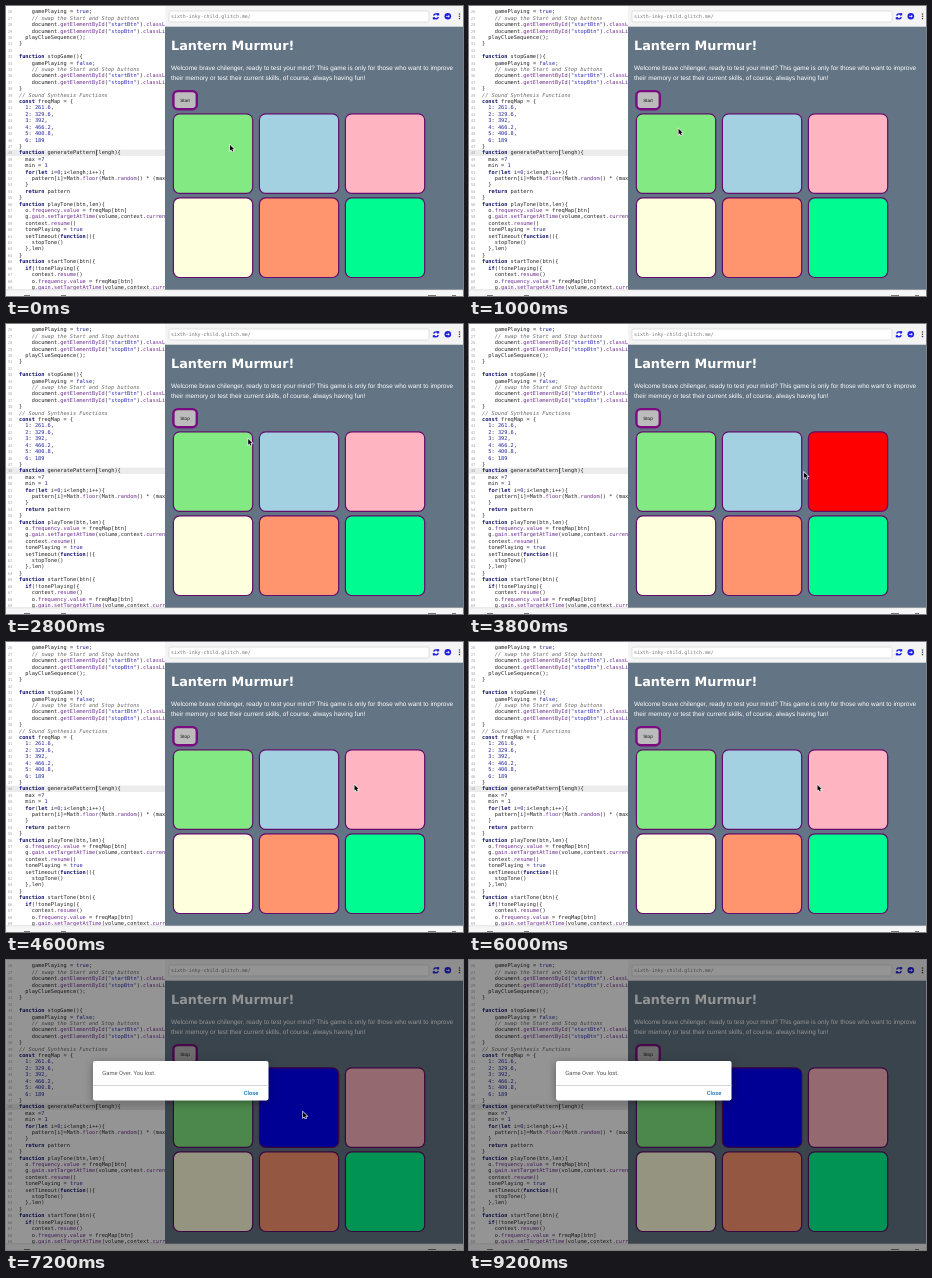
An HTML page with a canvas that plays this animation: 457 px wide and 290 px high, repeating every 9.4 s.

```html
<!DOCTYPE html>
<html lang="en">
<head>
<meta charset="utf-8">
<title>Memory game</title>
<style>
  html, body { margin: 0; width: 100%; height: 100%; overflow: hidden; background: #fff; }
  canvas { display: block; }
</style>
</head>
<body>
<canvas id="stage" width="457" height="290"></canvas>
<script>
const ctx = document.getElementById("stage").getContext("2d");
const LOOP = 9400, STEP = 200;
const MONO = '"DejaVu Sans Mono", monospace';
const SANS = '"Liberation Sans", sans-serif';
const ROBOTO = 'Roboto, sans-serif';
const CHAR = 3.18, LINE = 6.41, CODE_X = 13;

const code = `    gamePlaying = true;
    // swap the Start and Stop buttons
    document.getElementById("startBtn").classList.add("hidden");
    document.getElementById("stopBtn").classList.remove("hidden");
  playClueSequence();
}

function stopGame(){
    gamePlaying = false;
    // swap the Start and Stop buttons
    document.getElementById("startBtn").classList.remove("hidden");
    document.getElementById("stopBtn").classList.add("hidden");
}
// Sound Synthesis Functions
const freqMap = {
  1: 261.6,
  2: 329.6,
  3: 392,
  4: 466.2,
  5: 400.8,
  6: 189
}
function generatePattern(lengh){
  max =7
  min = 1
  for(let i=0;i<lengh;i++){
    pattern[i]=Math.floor(Math.random() * (max - min) + min)
  }
  return pattern
}
function playTone(btn,len){
  o.frequency.value = freqMap[btn]
  g.gain.setTargetAtTime(volume,context.currentTime + 0.05,0.025)
  context.resume()
  tonePlaying = true
  setTimeout(function(){
    stopTone()
  },len)
}
function startTone(btn){
  if(!tonePlaying){
    context.resume()
    o.frequency.value = freqMap[btn]
    g.gain.setTargetAtTime(volume,context.currentTime + 0.05,0.025)`.split("\n");

const tokens = /\/\/.*|"[^"]*"|[\d.]*\d|\.[a-z]\w*|\w+|[^\w\s".]+/gi;
const tokenStyles = [
  [/^\/\//, "#666", "italic "],
  [/^"/, "#2a2ab4", ""],
  [/^(function|const|for|let|return|if)$/, "#14146e", "bold "],
  [/^(\d|true|false)/, "#24249c", ""],
  [/^\./, "#6c2a90", ""],
  [/./, "#222", ""]
];
const tiles = ["#83ea83", "#a4d1e1", "#ffb4c1", "#feffdc", "#ff956f", "#00fc90"];

// Pointer stops: time, x, y
const pointerPath = [
  [0, 224, 139], [600, 224, 139], [1600, 183, 93], [2200, 183, 93], [3600, 333.5, 149],
  [4600, 348.5, 143], [6000, 348.5, 143], [6600, 297, 152], [LOOP, 297, 152]
];

function text(str, x, y, font, color, align = "left") {
  ctx.font = font;
  ctx.fillStyle = color;
  ctx.textAlign = align;
  ctx.fillText(str, x, y);
}

function rect(x, y, w, h, color) {
  ctx.fillStyle = color;
  ctx.fillRect(x, y, w, h);
}

function box(x, y, w, h, radius, fill, stroke, width = 1) {
  ctx.beginPath();
  ctx.roundRect(x, y, w, h, radius);
  ctx.fillStyle = fill;
  ctx.fill();
  if (!stroke) return;
  ctx.strokeStyle = stroke;
  ctx.lineWidth = width;
  ctx.stroke();
}

function dot(x, y, r, color) {
  ctx.beginPath();
  ctx.arc(x, y, r, 0, 7);
  ctx.fillStyle = color;
  ctx.fill();
}

function drawEditor() {
  ctx.save();
  ctx.beginPath();
  ctx.rect(0, 0, 159, 284);
  ctx.clip();
  rect(0, 143.6, 159, 6.4, "#ececec");
  code.forEach((line, row) => {
    const y = 7.3 + row * LINE;
    text(26 + row, 6.5, y, "4px " + MONO, "#aaa", "right");
    for (const m of line.matchAll(tokens)) {
      const [, color, style] = tokenStyles.find(([re]) => re.test(m[0]));
      text(m[0], CODE_X + m.index * CHAR, y, style + "5.28px " + MONO, color);
    }
  });
  rect(CODE_X + 24.2 * CHAR, 143.7, 0.7, 6.2, "#333");
  ctx.restore();
}

function drawToolbar() {
  rect(159, 0, 298, 21, "#f4f4f4");
  box(163, 5, 260, 11, 1.5, "#fff", "#d4d4d4", 0.7);
  text("sixth-inky-child.glitch.me/", 165, 12, "4.92px " + MONO, "#777");
  const blue = "#2020e0";
  ctx.strokeStyle = blue;
  ctx.lineWidth = 1.4;
  for (const start of [0.3, 3.44]) {
    ctx.beginPath();
    ctx.arc(430, 10.3, 2.4, start, start + 2.3);
    ctx.stroke();
  }
  rect(431, 7.2, 2.2, 2.2, blue);
  rect(426.8, 11.2, 2.2, 2.2, blue);
  dot(441.8, 10.3, 3.3, blue);
  rect(440.1, 9.9, 3.4, 0.8, "#fff");
  rect(442.3, 9.2, 0.8, 2.2, "#fff");
  for (const y of [8, 10.3, 12.6]) dot(453.5, y, 0.8, "#444");
}

function drawGame(t) {
  rect(159, 20.7, 298, 263.3, "#637484");
  text("Lantern Murmur!", 165, 43.6, 'bold 12.8px "DejaVu Sans", sans-serif', "#fff");
  const intro = "6.4px " + SANS;
  text("Welcome brave chilenger, ready to test your mind? This game is only for those who want to improve",
    165, 63.8, intro, "#fff");
  text("their memory or test their current skills, of course, always having fun!", 165, 73.5, intro, "#fff");

  const hovered = t >= 1600 && t < 2000;
  box(167.4, 85.1, 23.4, 18.2, 4.5, hovered ? "#fff" : "#bcbcbc", "#7b0b80", 2.4);
  text(t < 2000 ? "Start" : "Stop", 179, 95.7, "4.6px " + SANS, "#111", "center");

  const redLit = t >= 3000 && t < 4000, blueLit = t >= 6800;
  tiles.forEach((color, i) => {
    if (i === 2 && redLit) color = "#f00";
    if (i === 1 && blueLit) color = "#00f";
    box(167.4 + i % 3 * 86, 107.8 + (i > 2) * 84.1, 79.3, 79.6, 6.2, color, "#620c6c", 1.2);
  });
}

function drawDock() {
  rect(0, 284, 457, 6, "#f6f6f6");
  rect(0, 283.6, 457, 0.6, "#ccc");
  for (const [x, w] of [[18, 6], [55, 5], [422, 8], [446, 4]]) rect(x, 289, w, 1, "#777");
}

function drawDialog() {
  rect(0, 0, 457, 290, "rgba(0,0,0,0.42)");
  ctx.save();
  ctx.shadowColor = "rgba(0,0,0,0.35)";
  ctx.shadowBlur = 9;
  ctx.shadowOffsetY = 2;
  box(87, 101, 175.5, 39.5, 2, "#fff");
  ctx.restore();
  rect(87, 125, 175.5, 1, "#d4d4d4");
  text("Game Over. You lost.", 96.3, 115.4, "5.8px " + ROBOTO, "#555");
  text("Close", 252.3, 135, "500 5.8px " + ROBOTO, "#1478b8", "right");
}

function drawPointer(t) {
  const next = pointerPath.findIndex(p => p[0] > t);
  const [t0, x0, y0] = pointerPath[next - 1], [t1, x1, y1] = pointerPath[next];
  const u = (t - t0) / (t1 - t0), k = u * u * (3 - 2 * u);
  ctx.save();
  ctx.translate(x0 + (x1 - x0) * k, y0 + (y1 - y0) * k);
  const arrow = new Path2D("M0 0V5.6L1.3 4.4L2.2 6.5L3.2 6.1L2.3 4L4 3.9Z");
  ctx.strokeStyle = "#eee";
  ctx.lineWidth = 1.3;
  ctx.stroke(arrow);
  ctx.fillStyle = "#000";
  ctx.fill(arrow);
  ctx.restore();
}

function draw(now) {
  const t = Math.floor(now % LOOP / STEP) * STEP;
  ctx.textRendering = "geometricPrecision";
  rect(0, 0, 457, 290, "#fff");
  drawEditor();
  drawToolbar();
  drawGame(t);
  drawDock();
  if (t >= 7200) drawDialog();
  if (t < 8400) drawPointer(t);
  requestAnimationFrame(draw);
}
requestAnimationFrame(draw);
</script>
</body>
</html>
```
